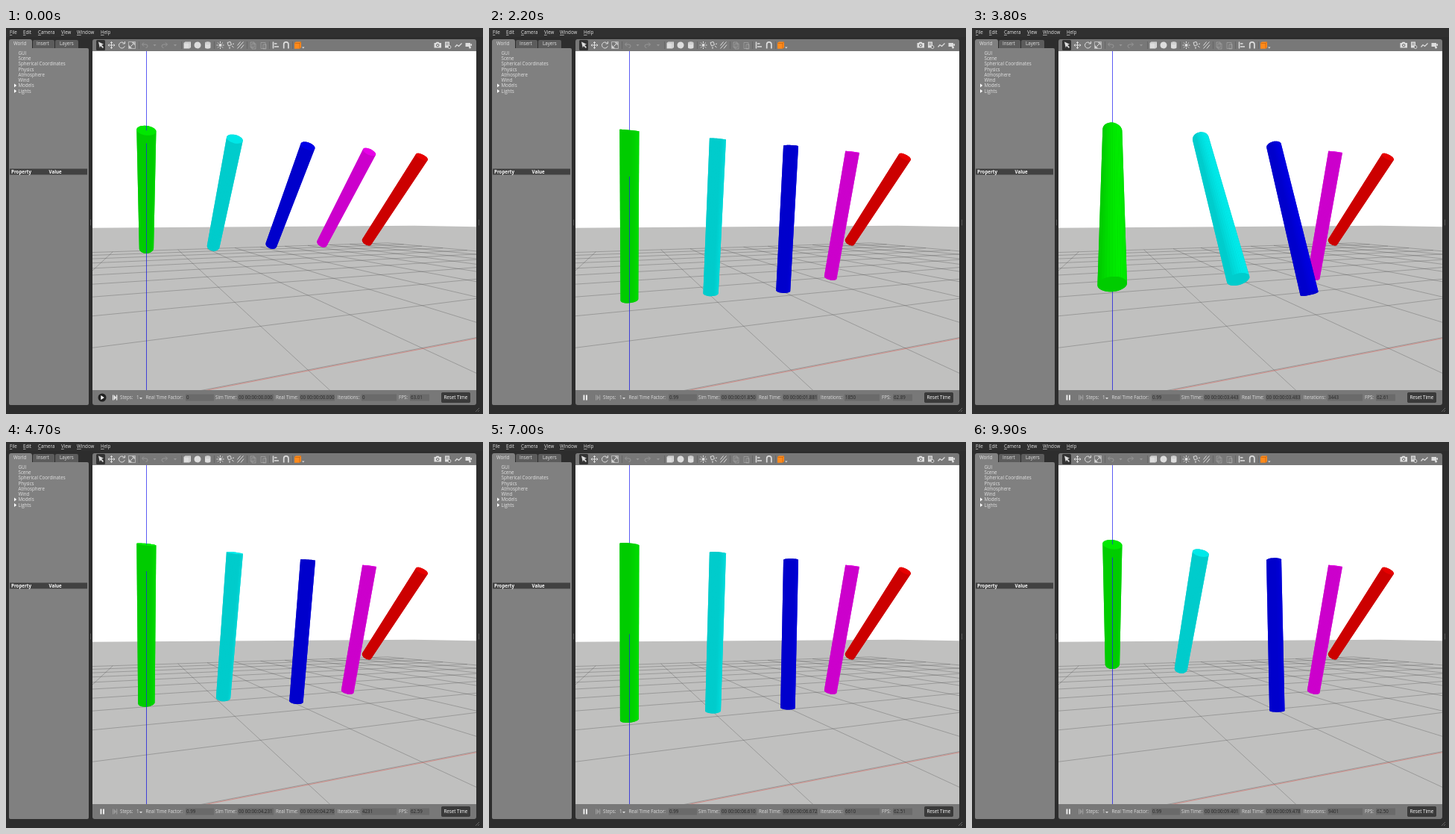
An HTML page with a canvas that plays this animation: 640x517 px, repeating every 10 s.

```html
<!DOCTYPE html>
<html lang="en">
<head>
<meta charset="utf-8">
<title>Pendulums with joint friction</title>
<style>
  html, body { margin: 0; width: 100%; height: 100%; overflow: hidden; background: #2d2d2d; }
  svg, canvas { position: absolute; left: 0; top: 0; display: block; }
  canvas { left: 116px; top: 31px; }
  text { font: 6.2px "Open Sans", "Noto Sans", sans-serif; fill: #e2e2e2; white-space: pre; }
  .bold { font-weight: 700; fill: #fff; }
  .value { fill: #262626; }
  .label { fill: #dcdcdc; }
  .icon { fill: none; stroke: #dedede; stroke-width: 1; }
  .solid { fill: #dedede; stroke: none; }
  .dim { opacity: .3; }
</style>
</head>
<body>
<svg id="ui" width="640" height="517" viewBox="0 0 640 517">
  <rect width="640" height="517" fill="#2d2d2d"/>
  <rect width="640" height="12" fill="#303030"/>
  <g id="menu"></g>

  <path d="M4 30V18q0-3 3-3h25q3 0 3 3v12z" fill="#808080"/>
  <path d="M36 27V18q0-2 2-2h25q2 0 2 2v9zM66 27V18q0-2 2-2h27q2 0 2 2v9z" fill="#5c5c5c"/>
  <rect x="4" y="27" width="107" height="478" rx="2" fill="#808080"/>
  <rect x="5" y="188.500" width="104" height="8" fill="#414141"/>
  <path d="M11 74.500l3.200 2.500-3.200 2.500zM11 82l3.200 2.500-3.200 2.500z" fill="#fff"/>
  <g id="tree"></g>
  <text class="bold" x="7" y="194.500">Property</text>
  <text class="bold" x="57.500" y="194.500">Value</text>
  <path d="M113.500 257v8M634.500 257v8" stroke="#777" stroke-dasharray="1 1"/>

  <path d="M116 31V18q0-3 3-3h509q3 0 3 3v13z" fill="#787878"/>
  <g class="icon">
    <rect x="121" y="16" width="12" height="14" rx="1.500" fill="#333" stroke="none"/>
    <path d="M124 18.500l7 3.300-2.700 1 2.700 3-1.300 1.200-2.700-3-1.200 2.600z" class="solid"/>
    <path d="M141.500 18.500v9M137 23h9M140 20l1.500-1.500 1.500 1.500M140 26l1.500 1.500 1.500-1.500M138.500 21.500L137 23l1.500 1.500M144.500 21.500L146 23l-1.500 1.500"/>
    <path d="M158.600 20.500a4 4 0 1 0 .7 3.800M159.500 18v3h-3"/>
    <path d="M164.500 18.500h9v9h-9z" stroke-width=".6"/>
    <path d="M166 26l6-6M169 19.800h3.200v3.200M165.500 23.500v3h3"/>
    <g class="dim">
      <path d="M183 22h4.500q2.500 0 2.500 2.200t-2.500 2.300M185 19.500l-2.500 2.500 2.500 2.500"/>
      <path d="M216 22h-4.500q-2.500 0-2.500 2.200t2.500 2.300M214 19.500l2.500 2.500-2.500 2.500"/>
      <path d="M197.500 22h4l-2 2.500zM225 22h4l-2 2.500z" class="solid"/>
    </g>
    <path d="M238.500 20l2-1.500h7.500v7.500l-2 1.500h-7.500z" class="solid"/>
    <path d="M238.500 20h7.500v7.500M246 20l2-1.500" stroke="#aaa" stroke-width=".5"/>
    <circle cx="257" cy="23" r="4.500" class="solid"/>
    <path d="M267 20q0-1.800 3.700-1.800t3.800 1.800v6q0 1.700-3.800 1.700T267 26z" class="solid"/>
    <ellipse cx="270.700" cy="20.200" rx="3.300" ry="1.200" stroke="#aaa" stroke-width=".5"/>
    <circle cx="287.500" cy="23" r="2" class="solid"/>
    <path d="M287.500 18v2M287.500 26v2M282.500 23h2M290.500 23h2M284 19.500l1.400 1.400M289.600 25.100l1.400 1.400M284 26.500l1.400-1.400M289.600 20.900l1.400-1.400"/>
    <path d="M297 19.500l4-1 1.500 4-4 1.500zM303 24l2.500 2M300 25v3M304 21.500l2-.5"/>
    <path d="M310.500 23.500l4-5M310.500 27.500l8-9M315 27.500l4-5"/>
    <g class="dim">
      <path d="M328 19h5v7h-5zM330 21h5v7h-5zM342 19.500h6v8h-6zM345 22h4v6h-4z"/>
    </g>
    <path d="M358.500 18.500v9M360 21h3.500M360 25h6" stroke-width="1.500"/>
    <path d="M372.700 27.500V22a3.100 3.100 0 0 1 6.200 0v5.500" stroke-width="1.700"/>
    <path d="M387 20l2-1.500h7v7.500l-2 1.700h-7z" fill="#ff8a1c" stroke="none"/>
    <path d="M387.500 20.500h6.500v7M394 20.500l2-1.800" stroke="#b55c08" stroke-width=".6"/>
    <path d="M397 25.500h3.500l-1.700 2z" class="solid"/>
    <path d="M178.500 18v10M235.500 18v10M279.500 18v10M323.500 18v10M353.500 18v10M384.500 18v10" stroke="#666"/>
    <path d="M574.500 20h2l1-1.300h3l1 1.300h2.500v6.500h-9.500z" class="solid"/>
    <circle cx="579.200" cy="23.200" r="1.700" stroke="#666"/>
    <path d="M589 18.500h6v8h-6z" class="solid"/>
    <path d="M590 20.500h4M590 22.500h4" stroke="#666" stroke-width=".7"/>
    <circle cx="595" cy="25.500" r="1.900" stroke="#dedede" fill="#666"/>
    <path d="M602.500 25.500l2.500-3 2.500 2 4-4" stroke-width="1.200"/>
    <path d="M616.500 20h6.500v5h-6.500zM623 22l2-1.200v3.500l-2-1" class="solid"/>
    <circle cx="622.500" cy="26" r="1.500" class="solid"/>
  </g>

  <path d="M116 485h515v17q0 3-3 3H119q-3 0-3-3z" fill="#787878"/>
  <path d="M241 490.500h38v9h-38zM311 490.500h48v9h-48zM394 490.500h47v9h-47zM477 490.500h47v9h-47zM542 490.500h26v9h-26z" fill="#6a6a6a"/>
  <g id="play">
    <circle cx="129" cy="495" r="5.500" fill="#222"/>
    <path d="M127.300 492l4.500 3-4.500 3z" fill="#fff"/>
  </g>
  <path id="pause" d="M126.500 491.500h1.900v7h-1.900zM130 491.500h1.900v7H130z" fill="#f0f0f0"/>
  <path id="step" d="M143 491.500h1.300v7H143zM145 491.500l3 3.500-3 3.500zM148 491.500h1.300v7H148z" fill="#eee"/>
  <path d="M179 495h4l-2 2.300z" fill="#ddd"/>
  <g id="status"></g>
  <rect x="584.500" y="488.500" width="38" height="13" rx="1" fill="#3a3a3a" stroke="#2c2c2c" stroke-width=".7"/>
  <text x="587.500" y="497.200" style="fill:#fff">Reset Time</text>
  <path d="M630 514l5-5M633 514l2-2" stroke="#666"/>
</svg>
<canvas id="scene" width="515" height="454"></canvas>

<script>
const LOOP = 10000, TICK = 100, FRAMES = LOOP / TICK;
const $ = id => document.getElementById(id);

function addText(parent, x, y, str, cls = "") {
  const el = document.createElementNS("http://www.w3.org/2000/svg", "text");
  el.setAttribute("x", x);
  el.setAttribute("y", y);
  el.setAttribute("class", cls);
  el.textContent = str;
  $(parent).append(el);
  return el;
}

// Panel texts
[["File", 5], ["Edit", 23], ["Camera", 43], ["View", 74], ["Window", 95], ["Help", 127]].forEach(([s, x]) => {
  const el = addText("menu", x, 8, "");
  const key = document.createElementNS("http://www.w3.org/2000/svg", "tspan");
  key.textContent = s[0];
  key.setAttribute("text-decoration", "underline");
  el.append(key, s.slice(1));
});
[["World", 10], ["Insert", 41], ["Layers", 72]].forEach(([s, x]) => addText("tree", x, 23.4, s));
["GUI", "Scene", "Spherical Coordinates", "Physics", "Atmosphere", "Wind", "Models", "Lights"]
  .forEach((s, i) => addText("tree", 16.5, 35.7 + i * 7.28, s));
[["Steps:", 153], ["1", 175], ["Real Time Factor:", 187.5], ["Sim Time:", 281],
 ["Real Time:", 362], ["Iterations:", 445], ["FPS:", 527]]
  .forEach(([s, x]) => addText("status", x, 497.2, s, "label"));
const [factor, simClock, realClock, iterations, fps] =
  [242, 312, 395, 478, 543].map(x => addText("status", x, 497.2, "", "value"));

// Status values: [refresh, sim ms, real ms, fps]
const readings = [
  [0, 58, 62, 63], [9, 1850, 1881, 62.89], [17, 3443, 3483, 62.61], [26, 5216, 5268, 62.56],
  [33, 6610, 6672, 62.51], [39, 7805, 7874, 62.51], [47, 9401, 9478, 62.5]
];
function reading(n) {
  let i = 1;
  while (i < readings.length - 1 && readings[i][0] < n) i++;
  const a = readings[i - 1], b = readings[i], f = (n - a[0]) / (b[0] - a[0]);
  return a.map((v, j) => v + (b[j] - v) * f);
}
const clock = ms => "00 00:00:0" + (ms / 1000).toFixed(3);

function drawStatus(t) {
  const running = t >= 300;
  $("play").style.display = running ? "none" : "";
  $("pause").style.display = running ? "" : "none";
  $("step").style.opacity = running ? .3 : 1;
  const n = Math.floor((t - 330) / 200.5);
  const [, sim, real, rate] = n < 0 ? [0, 0, 0, 63.01] : reading(n).map((v, i) => i < 3 ? Math.round(v) : v);
  factor.textContent = n < 0 ? "0" : "0.99";
  simClock.textContent = clock(sim);
  realClock.textContent = clock(real);
  iterations.textContent = sim;
  fps.textContent = rate.toFixed(2);
}

// Pendulums: rods of length 2 hung at height 3, released at 45 degrees, with dry friction
const RADIUS = .1, LENGTH = 2, PIVOT = 3, GRAVITY = 7.375;
const rods = [
  { rgb: [0, 1, 0], friction: 0 },
  { rgb: [0, 1, 1], friction: .0375 },
  { rgb: [0, 0, 1], friction: .375 },
  { rgb: [1, 0, 1], friction: 3.74 },
  { rgb: [1, 0, 0], friction: 7.5 }
];
function swing(friction) {
  const poses = [], dt = .001;
  let angle = Math.PI / 4, speed = 0, step = 0;
  for (let k = 0; k < FRAMES; k++) {
    const end = Math.round((k * TICK - 286) * .9927);
    for (; step < end; step++) {
      speed -= GRAVITY * Math.sin(angle) * dt;
      speed = Math.sign(speed) * Math.max(0, Math.abs(speed) - friction * dt);
      angle += speed * dt;
    }
    poses.push(angle);
  }
  return poses;
}
rods.forEach(rod => rod.poses = swing(rod.friction));

// Camera at (0, -4, 2), level, turned to the right
const ctx = $("scene").getContext("2d");
const FOCAL = 446, CX = 258, CY = 227, NEAR = .2;
const YAW = Math.atan(185.5 / FOCAL), SIN = Math.sin(YAW), COS = Math.cos(YAW);
const EYE = [0, -4, 2], SUN = [.483, -.097, .87];
const dot = (a, b) => a[0] * b[0] + a[1] * b[1] + a[2] * b[2];
const view = ([x, y, z]) => [x * COS - (y + 4) * SIN, z - 2, x * SIN + (y + 4) * COS];
const toScreen = ([r, u, d]) => [CX + FOCAL * r / d, CY - FOCAL * u / d];
const project = p => toScreen(view(p));

function polygon(pts) {
  const path = new Path2D();
  pts.forEach(p => path.lineTo(p[0], p[1]));
  path.closePath();
  return path;
}
function line(p, q, colour, shift = 0) {
  let a = view(p), b = view(q);
  if (a[2] > b[2]) [a, b] = [b, a];
  if (b[2] <= NEAR) return;
  if (a[2] < NEAR) {
    const f = (NEAR - a[2]) / (b[2] - a[2]);
    a = a.map((v, i) => v + (b[i] - v) * f);
  }
  const [x1, y1] = toScreen(a), [x2, y2] = toScreen(b);
  ctx.strokeStyle = colour;
  ctx.beginPath();
  ctx.moveTo(x1, y1 + shift);
  ctx.lineTo(x2, y2 + shift);
  ctx.stroke();
}
function upright(from, to) {
  ctx.fillStyle = "rgba(30,30,240,.72)";
  ctx.fillRect(72, from, 1, to - from);
}

function drawGround() {
  ctx.fillStyle = "#fff";
  ctx.fillRect(0, 0, 515, 454);
  const left = project([-100, 100, 0]), corner = project([100, 100, 0]), right = project([100, 0, 0]);
  ctx.fillStyle = "#c0c0bf";
  ctx.fill(polygon([left, corner, right, [515, 454], [0, 454]]));
  ctx.lineWidth = .8;
  for (let k = -20; k <= 20; k += 2) {
    line([k, -20, 0], [k, 20, 0], "rgba(70,70,70,.4)");
    line([-20, k, 0], [20, k, 0], "rgba(70,70,70,.4)");
  }
  line([0, 0, 0], [20, 0, 0], "rgba(225,70,60,.55)", 1.2);
}

// Draws one rod and returns its outline
function drawRod(x, angle, rgb) {
  const SIDES = 32, s = Math.sin(angle), c = Math.cos(angle);
  const normal = i => {
    const a = 2 * Math.PI * i / SIDES;
    return [Math.cos(a), Math.sin(a) * c, Math.sin(a) * s];
  };
  const point = (i, along) => {
    const n = normal(i);
    return [x + RADIUS * n[0], along * s + RADIUS * n[1], PIVOT - along * c + RADIUS * n[2]];
  };
  const shade = n => {
    const light = Math.round(204 + 40 * Math.max(0, dot(n, SUN)));
    return `rgb(${rgb.map(v => v * light)})`;
  };
  const outline = new Path2D(), faces = [];
  const addFace = (pts, n) => {
    if (dot(n, EYE.map((v, i) => v - pts[0][i])) <= 0) return;
    const path = polygon(pts.map(project));
    outline.addPath(path);
    faces.push([path, shade(n)]);
  };
  for (let i = 0; i < SIDES; i++)
    addFace([point(i, 0), point(i + 1, 0), point(i + 1, LENGTH), point(i, LENGTH)], normal(i + .5));
  const ring = along => Array.from({ length: SIDES }, (_, i) => point(i, along));
  addFace(ring(0).reverse(), [0, -s, c]);
  addFace(ring(LENGTH), [0, s, -c]);

  // A plain base coat keeps the background out of the seams
  ctx.fillStyle = shade([0, 0, 0]);
  ctx.fill(outline);
  for (const [path, colour] of faces) {
    ctx.fillStyle = colour;
    ctx.fill(path);
  }
  return outline;
}

// The vertical axis runs through the first pivot, so a rod leaning away shows it again
function drawAxisInFront(angle, outline) {
  const s = Math.sin(angle), c = Math.cos(angle), along = RADIUS * c / s;
  ctx.save();
  ctx.clip(outline);
  if (4 * s > c) upright(0, project([0, 0, PIVOT])[1]);
  if (s > 0 && along < LENGTH)
    upright(project([0, 0, PIVOT - along * c - RADIUS * s])[1], 454);
  ctx.restore();
}

function drawScene(k) {
  drawGround();
  upright(0, 454);
  let outline;
  for (let i = rods.length - 1; i >= 0; i--) outline = drawRod(i, rods[i].poses[k], rods[i].rgb);
  drawAxisInFront(rods[0].poses[k], outline);
}

let shown = -1;
const start = performance.now();
function play() {
  const k = Math.floor((performance.now() - start) % LOOP / TICK);
  if (k !== shown) {
    shown = k;
    drawScene(k);
    drawStatus(k * TICK);
  }
  requestAnimationFrame(play);
}
play();
</script>
</body>
</html>
```
